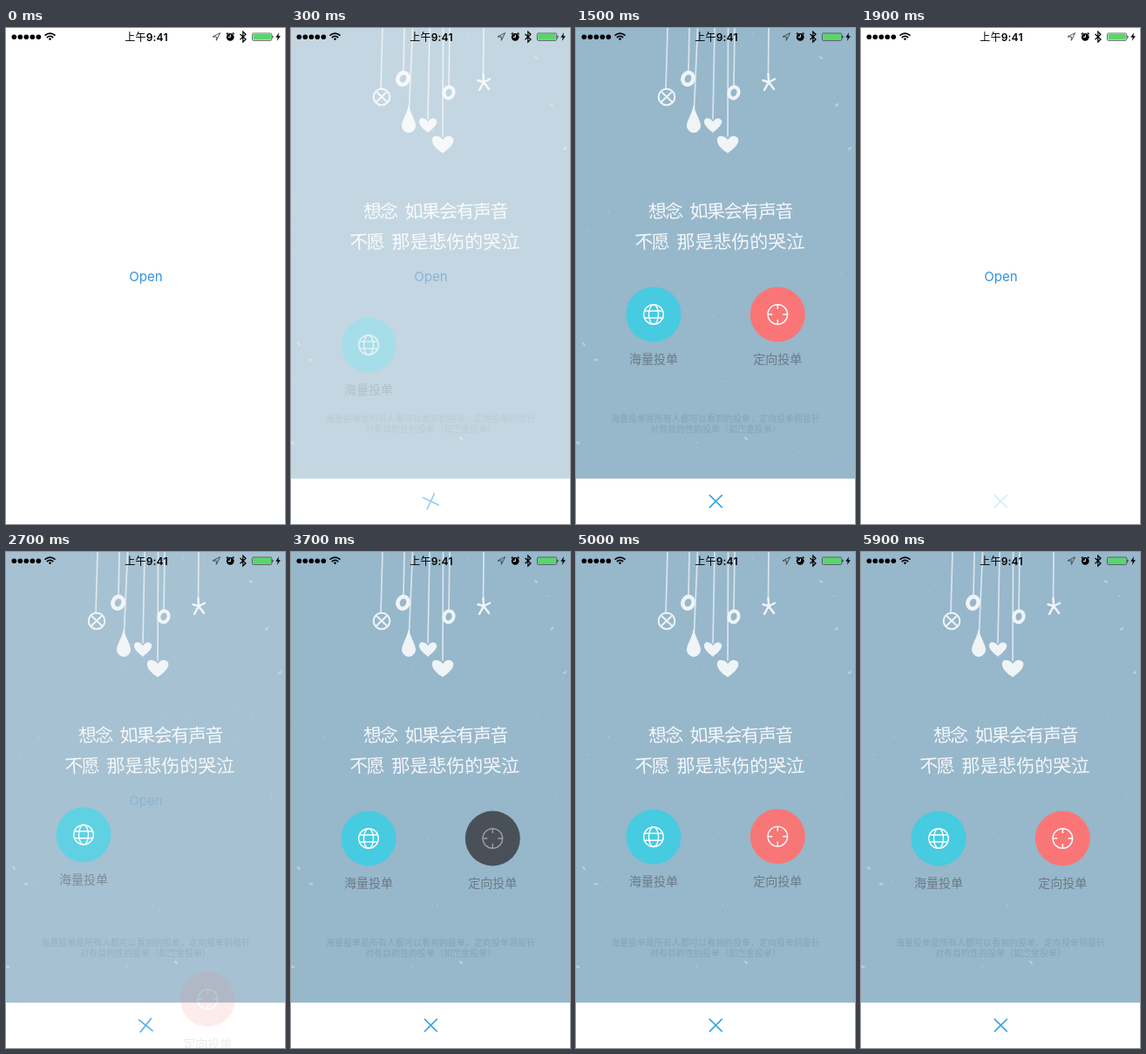
Recreate the animation shown at these times as an HTML page. Size 320 by 568 pixels, loop 6 s.

```html
<!DOCTYPE html>
<html lang="zh">
<head>
<meta charset="utf-8">
<title>Pop menu</title>
<style>
  html, body { margin: 0; width: 100%; height: 100%; overflow: hidden; background: #fff; }
  svg { display: block; width: 100%; height: 100%; }
  text { font-family: Inter, "Noto Sans CJK SC", "Noto Sans CJK", sans-serif; text-anchor: middle; }
  .line { fill: none; stroke: #fff; stroke-width: 1.4; }
  .label { font-size: 14px; fill: #6a7a85; }
  .note { font-size: 10px; fill: #84a3b6; }
  .verse { font-size: 21px; font-weight: 300; fill: #fff; text-anchor: start; }
  .chalk { fill: none; stroke: #fff; stroke-linecap: round; stroke-linejoin: round; }
</style>
</head>
<body>
<svg viewBox="0 0 320 568">
  <text id="open" x="160.5" y="289.7" font-size="15" fill="#2f92e4">Open</text>

  <g id="panel">
    <rect width="320" height="516" fill="#97b7cb"/>
    <g id="specks" fill="#fff"></g>

    <g class="chalk" opacity=".85">
      <path stroke-width="1.7" opacity=".75" d="M105 0L103 70M130 0L129 50M139.500 0L135.500 92M159 0L157 104M174.500 0L174 124M182 0L181 66M221 0L220.500 54"/>
      <circle cx="104" cy="79" r="9.300" stroke-width="2"/>
      <path stroke-width="2" d="M99 74L109.500 84M109 74L98.500 84"/>
      <ellipse cx="128.500" cy="58" rx="6" ry="7" stroke-width="4.600" transform="rotate(20 128.500 58)"/>
      <ellipse cx="181" cy="74" rx="5.500" ry="6.500" stroke-width="4" transform="rotate(20 181 74)"/>
      <path fill="#fff" d="M135 90C137 99 142.500 106 142.500 112A7.500 7.500 0 0 1 127.500 112C127.500 106 133 99 135 90Z"/>
      <path id="heart" fill="#fff" transform="translate(157 111)" d="M0 8C-13 0 -11 -9 -5 -7Q-1 -6 0 -3Q3 -8 7 -7C13 -5 9 2 0 8Z"/>
      <use href="#heart" transform="translate(-14.400 -.200) scale(1.200)"/>
      <path stroke-width="2.500" d="M220.500 53L221 62L214.500 60M221 62L228 58.500M216 71L221 62L227 70"/>
    </g>

    <g opacity=".9">
      <text class="verse" y="218" rotate="-4"><tspan x="83.500" letter-spacing="-2">想念</tspan><tspan x="131" letter-spacing="-1.400">如果会有声音</tspan></text>
      <text class="verse" y="253" rotate="-4"><tspan x="68" letter-spacing="-2">不愿</tspan><tspan x="116" letter-spacing="-.100">那是悲伤的哭泣</tspan></text>
    </g>

    <text class="note" x="160" y="451">海量投单是所有人都可以看到的投单，定向投单则是针</text>
    <text class="note" x="160" y="463">对有目的性的投单（如定金投单）</text>

    <rect y="516" width="320" height="52" fill="#fff"/>

    <g id="left">
      <circle r="31.500" fill="#46cbe0"/>
      <g class="line">
        <circle r="11.300"/>
        <ellipse rx="5.500" ry="11.300"/>
        <path d="M-10.500 -4H10.500M-10.500 4H10.500"/>
      </g>
      <text class="label" y="56">海量投单</text>
    </g>
    <g id="right">
      <circle id="disc" r="31.500"/>
      <g class="line" id="aim">
        <circle r="11.300"/>
        <path d="M0 -11V-6M0 11V6M-11 0H-6M11 0H6"/>
      </g>
      <text class="label" y="56">定向投单</text>
    </g>
  </g>

  <path id="cross" d="M-10.500 0H10.500M0 -10.500V10.500" fill="none" stroke="#3ba3e0" stroke-width="1.600"/>

  <g id="status">
    <g id="signal"></g>
    <g fill="none" stroke="#000" stroke-width="1.700">
      <path d="M44.500 8.700Q50.500 3.600 56.500 8.700M46.800 11Q50.500 7.900 54.200 11"/>
      <path d="M48.700 12.200Q50.500 10.700 52.300 12.200L50.500 14.200Z" fill="#000" stroke="none"/>
    </g>
    <text x="161" y="14.600" font-size="12" font-weight="600" letter-spacing=".2"><tspan font-weight="500">上午</tspan>9:41</text>
    <path d="M245.500 5.700L237 10H241.300V14.300Z" fill="none" stroke="#344" stroke-width=".9"/>
    <circle cx="257.200" cy="10.300" r="4.400"/>
    <path d="M252.800 7L254.600 5.500M261.600 7L259.800 5.500" stroke="#000" stroke-width="1.300"/>
    <path d="M257.300 7.500V10.600H254.800" fill="none" stroke="#fff"/>
    <path d="M268.500 7L275 13L271.800 16V4.200L275 7.200L268.500 13.300" fill="none" stroke="#000" stroke-width="1.200"/>
    <rect x="282.400" y="6" width="22.400" height="8.400" rx="1.500" fill="none" stroke="#444" stroke-width=".8"/>
    <rect x="283.400" y="7" width="20.400" height="6.400" rx=".6" fill="#57d66b"/>
    <path d="M305.500 8.500Q307.500 10.200 305.500 12Z"/>
    <path d="M313 5.300L309.300 10.700H311.700L310.900 14.700L314.900 9.200H312.400Z"/>
  </g>
</svg>

<script>
const LOOP = 6000;
const $ = id => document.getElementById(id);
const clamp = x => Math.min(1, Math.max(0, x));
const smooth = x => (x = clamp(x), x * x * (3 - 2 * x));
const setOpacity = (id, value) => $(id).setAttribute('opacity', value.toFixed(3));

const visits = [
  { tap: 100, open: 140, close: 1550, crossFade: 500 },
  { tap: 2200, open: 2473, press: 3500, close: 3800, crossFade: 600, picked: 'right' },
  { tap: 4600, open: 4640, close: Infinity, crossFade: 1 }
];
const buttons = [
  { id: 'left', x: 89, rise: 37, fall: 60 },
  { id: 'right', x: 231.3, rise: 179, fall: 0 }
];

// Underdamped spring from 0 to 1, seconds since release.
function spring(s) {
  if (s <= 0) return 0;
  const damping = 16.5, speed = 14;
  return 1 - Math.exp(-damping * s) *
    (Math.cos(speed * s) + damping / speed * Math.sin(speed * s));
}

function drawButton({ id, x, rise, fall }, visit, t) {
  const risen = t - visit.open - rise;
  let y = 600 - 272 * spring(risen / 1000);
  let alpha = smooth(risen / 200);
  let scale = 1;
  if (visit.picked) {
    const gone = smooth((t - visit.close) / 300);
    scale = 1 + gone * (id === visit.picked ? .8 : -.7);
    alpha *= 1 - gone;
  } else {
    const gone = clamp((t - visit.close - fall) / 220);
    y += 150 * gone * gone;
    alpha *= 1 - gone;
  }
  $(id).setAttribute('transform', `translate(${x} ${y.toFixed(2)}) scale(${scale.toFixed(3)})`);
  setOpacity(id, alpha);
}

function render(t) {
  const visit = visits.findLast(v => t >= v.tap);
  const shown = visit ? smooth((t - visit.open) / 300) : 0;
  const since = visit ? t - visit.close : 0;

  setOpacity('panel', visit ? shown * (1 - smooth(since / 320)) : 0);
  setOpacity('cross', visit ? shown * (1 - smooth(since / visit.crossFade)) : 0);
  setOpacity('open', visit ? .35 + .65 * clamp((t - visit.open) / 300) : 1);
  $('cross').setAttribute('transform', `translate(160.300 542) rotate(${45 * shown})`);
  if (!visit) return;

  const pressed = t >= visit.press && t < visit.close;
  $('disc').setAttribute('fill', pressed ? '#4a5058' : '#fa7676');
  setOpacity('aim', pressed ? .45 : 1);
  buttons.forEach(b => drawButton(b, visit, t));
}

function addScenery() {
  let seed = 11;
  const random = () => (seed = seed * 16807 % 2147483647) / 2147483647;
  let specks = '';
  const speck = (x, y, rx, ry, angle, alpha) => specks +=
    `<ellipse rx="${rx}" ry="${ry}" opacity="${alpha}" transform="translate(${x} ${y}) rotate(${angle})"/>`;
  for (let i = 0; i < 90; i++)
    speck(random() * 320, random() * 512, .4 + random() * .8, .6, random() * 180, .12 + random() * .2);
  [[281, 34, 30], [299, 88, -40], [314, 138, -30], [23, 380, 10], [9, 362, 50], [2, 475, 20],
   [195, 470, 40], [189, 461, 0]].forEach(([x, y, angle]) => speck(x, y, 2.6, 1.2, angle, .35));
  $('specks').innerHTML = specks;
  $('signal').innerHTML = [0, 1, 2, 3, 4]
    .map(i => `<circle cx="${9.3 + 7 * i}" cy="10.200" r="2.800"/>`).join('');
}

function tick() {
  render(performance.now() % LOOP);
  requestAnimationFrame(tick);
}

addScenery();
tick();
</script>
</body>
</html>
```
